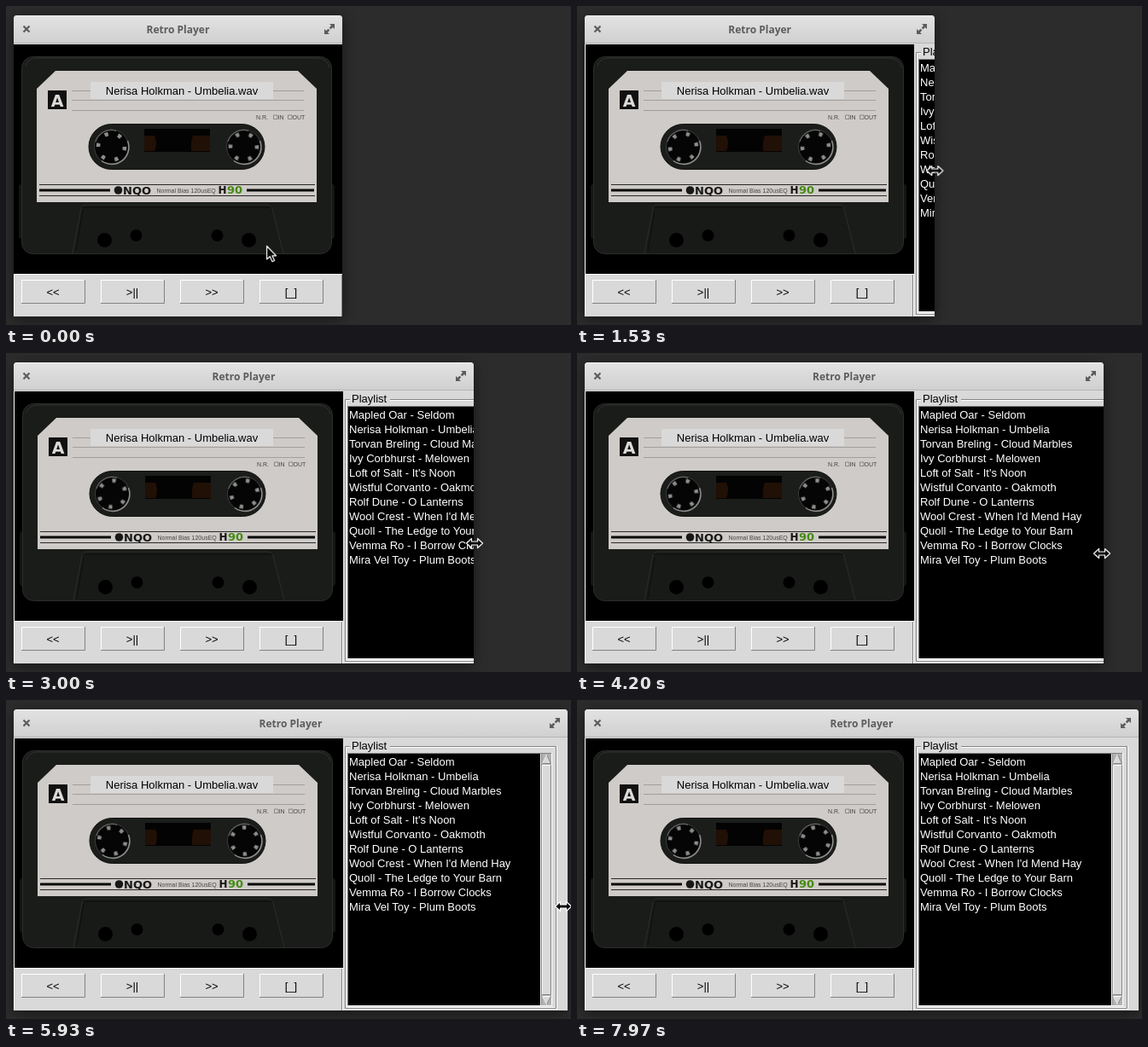
Write an HTML page that moves like this. It is 662 px wide and 374 px high and loops after 8000 ms.

```html
<!DOCTYPE html>
<html lang="en">
<head>
<meta charset="utf-8">
<title>Retro Player</title>
<style>
  html, body { margin: 0; width: 100%; height: 100%; overflow: hidden; background: #2c2c2c; }
  .stage { position: relative; width: 662px; height: 374px; overflow: hidden; }
  .window {
    position: absolute; left: 9px; top: 11px; width: 385px; height: 353px; overflow: hidden;
    border-radius: 4px 4px 0 0; background: #d9d9d9;
    box-shadow: 0 3px 15px rgba(0, 0, 0, .5);
    animation: resize 8s linear infinite;
  }
  .titlebar {
    position: absolute; inset: 0 0 auto; height: 33px; box-sizing: border-box;
    border-top: 1px solid #f1f1f1; border-bottom: 1px solid #b4b4b4;
    background: linear-gradient(#e2e2e2, #d0d0d0);
    font: 700 12px/32px "Open Sans", sans-serif; color: #5c5c5c; text-align: center;
  }
  .titlebar svg { position: absolute; top: 9px; }
  .close { left: 9px; }
  .expand { right: 9px; }
  .content { position: absolute; left: -9px; top: -11px; }
  .titlebar { z-index: 1; }
  text { font-family: "Liberation Sans", Arial, sans-serif; font-size: 13px; white-space: pre; }
  .wide { font-family: "DejaVu Sans", sans-serif; font-weight: 700; }
  .tiny { font-size: 7px; fill: #444; }
  .tape { animation: nudge 8s step-end infinite; }
  .reel { transform-box: fill-box; transform-origin: center; animation: spin 4s linear infinite; }
  .slider { animation: hover 8s step-end infinite; }
  .cursor { position: absolute; left: 0; top: 0; overflow: visible; animation: travel 8s linear infinite; }
  .arrow { animation: pointing 8s step-end infinite; }
  .sizer { animation: sizing 8s step-end infinite; }

  @keyframes resize {
    0%, 11.2% { width: 385px; }
    19.1% { width: 410px; }
    20.9% { width: 424px; }
    27.9% { width: 477px; }
    31.25% { width: 500px; }
    37.5% { width: 539px; }
    41.6% { width: 550px; }
    52.5% { width: 608px; }
    62.5% { width: 638px; }
    72.9%, 100% { width: 649px; }
  }
  @keyframes travel {
    0% { transform: translate(305px, 281px); }
    10.4%, 11.2% { transform: translate(395px, 190px); }
    19.1% { transform: translate(419px, 193px); }
    20.9% { transform: translate(434px, 198px); }
    27.9% { transform: translate(488px, 211px); }
    31.25% { transform: translate(511px, 216px); }
    37.5% { transform: translate(549px, 223px); }
    41.6% { transform: translate(560px, 225px); }
    52.5% { transform: translate(615px, 235px); }
    62.5% { transform: translate(647px, 240px); }
    72.9%, 75% { transform: translate(653px, 242px); }
    83.4% { transform: translate(646px, 262px); }
    92%, 100% { transform: translate(633px, 378px); }
  }
  @keyframes nudge { 0% { transform: translateX(-1px); } 11.4%, 100% { transform: none; } }
  @keyframes spin { to { transform: rotate(-360deg); } }
  @keyframes hover { 0% { fill: #d9d9d9; } 86% { fill: #ececec; } 90% { fill: #d9d9d9; } }
  @keyframes pointing { 0% { opacity: 1; } 10.2% { opacity: 0; } 78% { opacity: 1; } }
  @keyframes sizing { 0% { opacity: 0; } 10.2% { opacity: 1; } 78% { opacity: 0; } }
</style>
</head>
<body>
<div class="stage">
  <div class="window">
    <div class="titlebar">
      <svg class="close" width="12" height="12"><path d="M2.5 2.5l7 7m0-7l-7 7" stroke="#5c5c5c" stroke-width="2.2"/></svg>
      Retro Player
      <svg class="expand" width="12" height="12" fill="#5c5c5c">
        <path d="M6 0h6v6l-2.1-2.1-2.4 2.4-1.8-1.8 2.4-2.4zM0 6l2.1 2.1 2.4-2.4 1.8 1.8-2.4 2.4L6 12H0z"/>
      </svg>
    </div>

    <svg class="content" width="662" height="374">
      <path d="M9.5 45v319" stroke="#fff"/>
      <g class="tape">
        <path d="M10 45h385v269H10z"/>
        <rect x="16" y="209" width="370" height="64" rx="3" fill="#141514"/>
        <rect x="19.5" y="59.5" width="363" height="231" rx="13" fill="#1a1c1a" stroke="#2b2d2b"/>
        <path d="M24 70Q26 62 36 61H366Q378 62 380 72" fill="none" stroke="#303230"/>
        <path d="M79 290L89 238Q90 233 96 233H306Q312 233 313 238L326 290" fill="#181a18" stroke="#2c2e2c"/>
        <path d="M90 236H312M91 239L83 287" fill="none" stroke="#0d0e0d"/>
        <circle cx="116.5" cy="274.5" r="8.5"/>
        <circle cx="153.5" cy="269" r="7"/>
        <circle cx="248.5" cy="269" r="7"/>
        <circle cx="285.5" cy="274.5" r="8.5"/>

        <path d="M37 97L59 76H343L365 97V230H37z" fill="#cfcbc8"/>
        <path d="M78 99.5H350M78 110.5H350M78 122.5H350" stroke="#a29e9b"/>
        <path d="M50 99h22v22H50z" fill="#111"/>
        <text x="61" y="117.5" class="wide" font-size="19" text-anchor="middle" fill="#dedad7" style="font-size:19px">A</text>
        <text x="294" y="132.5" class="tiny">N.R.</text>
        <path d="M314.500 128h4.500v4.500h-4.500zM331.500 128h4.500v4.500h-4.500z" fill="none" stroke="#777" stroke-width=".8"/>
        <text x="319.500" y="132.500" class="tiny">IN</text>
        <text x="336.500" y="132.500" class="tiny">OUT</text>

        <rect x="98" y="138.500" width="206" height="53" rx="26.500" fill="#1b1d1b" stroke="#111"/>
        <path d="M163 144h77v27h-77z" fill="#040303"/>
        <path d="M163 152h12q4 9 0 18h-12zM220 152h20v18h-22q-1-10 2-18z" fill="#211006"/>
        <g id="hub">
          <circle cx="124.500" cy="165" r="20" fill="#050505" stroke="#3c3d3c"/>
          <path d="M143.500 158A20 20 0 0 1 113 181.500" fill="none" stroke="#8f908e" stroke-width="1.500"/>
          <path d="M106 159A19.500 19.500 0 0 1 130 146.300" fill="none" stroke="#646563" stroke-width="1.200"/>
          <circle class="reel" cx="124.500" cy="165" r="15.500" fill="none" stroke="#8d8e8b"
                  stroke-width="4.500" pathLength="60" stroke-dasharray="2.600 7.400"/>
        </g>
        <use href="#hub" x="155"/>

        <path d="M40 209.500H363M40 222.500H363" stroke="#272727"/>
        <path d="M40 216H123M283 216H362" stroke="#080808" stroke-width="3"/>
        <circle cx="132.500" cy="216" r="4.800" fill="#181818"/>
        <text x="138" y="220.500" class="wide" fill="#181818">NQO</text>
        <text x="177.500" y="218.500" class="tiny">Normal Bias 120usEQ</text>
        <text x="249.500" y="220" class="wide" fill="#181818" style="font-size:12px">H</text>
        <text x="260" y="220" class="wide" fill="#458b12">90</text>
      </g>

      <path d="M99 89h214v20H99z" fill="#d9d9d9"/>
      <text x="206" y="104" text-anchor="middle">Nerisa Holkman - Umbelia.wav</text>

      <path d="M10 314h385v50H10z" fill="#d9d9d9"/>
      <path d="M9 314.500H394M394.500 314v50" stroke="#fff"/>
      <path d="M393.500 315v49" stroke="#828282"/>
      <g id="buttons"></g>

      <path d="M395 45h267v319H395z" fill="#d9d9d9"/>
      <path d="M397.500 54.500h247v307h-247z" fill="none" stroke="#828282"/>
      <path d="M398.500 360V55.500H643M397 362.500H645.500V54M399 360.500H643" fill="none" stroke="#fff"/>
      <path d="M403 48h47v13h-47z" fill="#d9d9d9"/>
      <text x="405" y="58">Playlist</text>
      <path d="M400 62h228v297H400z" fill="#fff"/>
      <path d="M400 62h227v1H401v295h-1z" fill="#828282"/>
      <path d="M401 63h225v295H401z"/>
      <g id="tracks" fill="#fff"></g>

      <path d="M627 62h13v297h-13z" fill="#fff"/>
      <path d="M627 62h12v296h-12z" fill="#828282"/>
      <path d="M628 63h11v295h-11z" fill="#b3b3b3"/>
      <path class="slider" d="M628.500 76.500h10v269h-10z" stroke="#828282"/>
      <path d="M628.500 345V76.500H638" fill="none" stroke="#fff"/>
      <path d="M633.500 64L638.500 74.500H628.500z" fill="#d9d9d9" stroke="#828282"/>
      <path d="M628.500 74.500L633.500 64" stroke="#fff"/>
      <path d="M633.500 357L638.500 347.500H628.500z" fill="#d9d9d9" stroke="#828282"/>
      <path d="M633.500 357L628.500 347.500H638" fill="none" stroke="#fff"/>
    </svg>
  </div>

  <svg class="cursor" width="1" height="1" fill="#0a0a0a" stroke="#fff" stroke-width="1.200" stroke-linejoin="round">
    <path class="arrow" d="M.5 .5V16l3.700-3.300 2.700 6 2.600-1.200-2.600-5.700H11.500z"/>
    <path class="sizer" d="M-9.500 0L-3.500-5.500V-2H3.500V-5.500L9.500 0L3.500 5.500V2H-3.500V5.500z"/>
  </svg>
</div>
<script>
  const tracks = [
    "Mapled Oar - Seldom",
    "Nerisa Holkman - Umbelia",
    "Torvan Breling - Cloud Marbles",
    "Ivy Corbhurst - Melowen",
    "Loft of Salt - It's Noon",
    "Wistful Corvanto - Oakmoth",
    "Rolf Dune - O Lanterns",
    "Wool Crest - When I'd Mend Hay",
    "Quoll - The Ledge to Your Barn",
    "Vemma Ro - I Borrow Clocks",
    "Mira Vel Toy - Plum Boots"
  ];
  const label = (x, y, string, anchor = "start") => {
    const node = document.createElementNS("http://www.w3.org/2000/svg", "text");
    node.setAttribute("x", x);
    node.setAttribute("y", y);
    node.setAttribute("text-anchor", anchor);
    node.textContent = string;
    return node;
  };

  tracks.forEach((name, i) =>
    document.getElementById("tracks").append(label(402, 77 + 17 * i, name)));

  const buttons = document.getElementById("buttons");
  ["<<", ">||", ">>", "[_]"].forEach((caption, i) => {
    const x = 18 + 93 * i;
    buttons.insertAdjacentHTML("beforeend",
      `<path d="M${x + .5} 348V321.5h74" fill="none" stroke="#fff"/>
       <path d="M${x} 348.5h74.5V321" fill="none" stroke="#828282"/>`);
    buttons.append(label(x + 37, 340, caption, "middle"));
  });
</script>
</body>
</html>
```
